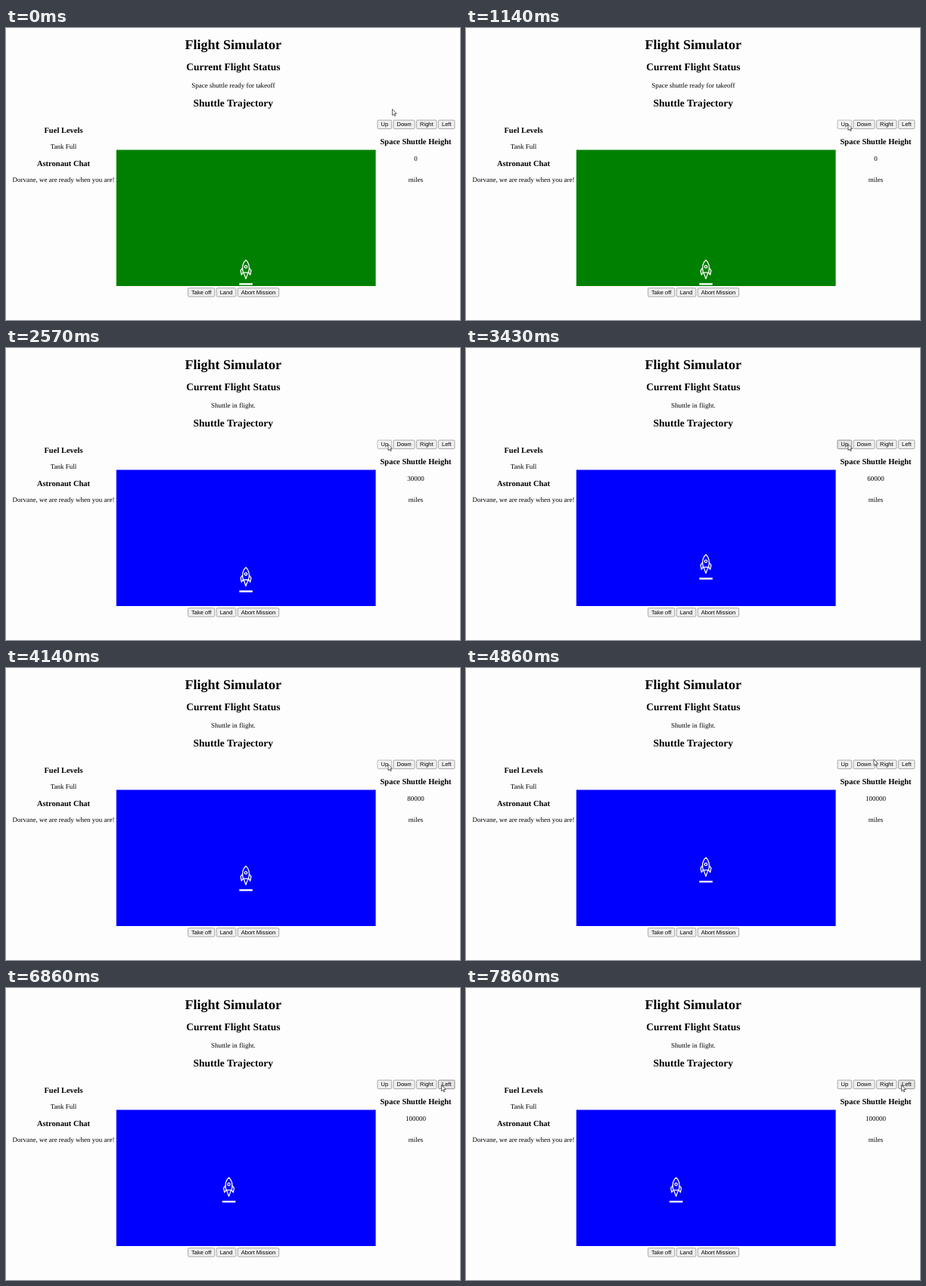
These frames come from a looping animation (600 px wide and 387 px high, 8000 ms). An HTML page:

```html
<!DOCTYPE html>
<html lang="en">
<head>
<meta charset="utf-8">
<title>Flight Simulator</title>
<style>
html, body { margin: 0; width: 100%; height: 100%; overflow: hidden; background: #fefdfe; }
svg { display: block; width: 600px; height: 387px; text-rendering: geometricPrecision; }
text { font: 9px "Liberation Serif", "Times New Roman", serif; text-anchor: middle; }
.h1 { font-size: 18px; font-weight: bold; }
.h2 { font-size: 13.5px; font-weight: bold; }
.h3 { font-size: 10.53px; font-weight: bold; }
.button text { font: 7.5px "Liberation Sans", Arial, sans-serif; }
.button rect { fill: #efefef; stroke: #767676; stroke-width: .6; }
.button.hover rect { fill: #e5e5e5; stroke: #4f4f4f; }
.button.press rect { fill: #f5f5f5; stroke: #8d8d8d; }
</style>
</head>
<body>
<svg id="stage" viewBox="0 0 600 387">
  <g transform="translate(300.3)">
    <text class="h1" y="27.6">Flight Simulator</text>
    <text class="h2" y="56.2">Current Flight Status</text>
    <text id="status" y="78.9"></text>
    <text class="h2" y="104.2">Shuttle Trajectory</text>
  </g>
  <g transform="translate(76)">
    <text class="h3" y="139">Fuel Levels</text>
    <text y="160.4">Tank Full</text>
    <text class="h3" y="182.6">Astronaut Chat</text>
    <text y="204.2">Dorvane, we are ready when you are!</text>
  </g>
  <g transform="translate(541.5)">
    <text class="h3" y="153.8">Space Shuttle Height</text>
    <text id="height" y="175.7"></text>
    <text y="204.2">miles</text>
  </g>

  <rect id="sky" x="145.8" y="161.5" width="342.8" height="180.5"/>
  <g id="rocket" fill="none" stroke="#fff" stroke-width="1.3" stroke-linejoin="round">
    <path d="M0 .5C-3.6 3.6-5.5 9-3.6 17H3.6C5.5 9 3.6 3.6 0 .5Z"/>
    <path d="M-4.5 11L-6.9 14.3-5.8 20-3.5 17M4.5 11L6.9 14.3 5.8 20 3.5 17M-2.9 17.3L0 25.3 2.9 17.3"/>
    <circle cy="9.3" r="1.7"/>
    <path d="M-8.7 32.3H8.8" stroke-width="2.4"/>
  </g>
  <g id="buttons"></g>
  <path id="cursor" d="M0 0V8.2L1.9 6.5 3.1 9.2 4.3 8.7 3.1 6H5.7Z" fill="#fff" stroke="#222" stroke-width=".7"/>
</svg>
<script>
const $ = id => document.getElementById(id);
const LOOP = 8000, FRAME = 1000 / 7, STEP = 5.625;
const PAD = 4.5, GAP = 2.4, BUTTON_H = 11.5;

// Each button is as wide as its label plus padding
function buttonRow(x, y, ...labels) {
  return labels.map(label => {
    const node = document.createElementNS('http://www.w3.org/2000/svg', 'g');
    node.setAttribute('class', 'button');
    node.innerHTML = `<rect y="${y}" height="${BUTTON_H}" rx="1.4"/><text y="${y + 8.1}">${label}</text>`;
    $('buttons').append(node);
    const [rect, text] = node.children;
    const left = x, w = text.getComputedTextLength() + 2 * PAD;
    rect.setAttribute('x', left);
    rect.setAttribute('width', w);
    text.setAttribute('x', left + w / 2);
    x += w + GAP;
    return { node, left, right: left + w, y };
  });
}
const buttons = [
  ...buttonRow(491, 122.1, 'Up', 'Down', 'Right', 'Left'),
  ...buttonRow(240.6, 344.6, 'Take off', 'Land', 'Abort Mission')
];

const clamp = (v, lo, hi) => Math.min(hi, Math.max(lo, v));

// Click counts by frame: the "Up" clicks speed up, the "Left" clicks come in two even bursts
const upClicks = f => f < 9 ? 0 : Math.min(10, 1 + Math.floor(((f - 8.96) / 3.955) ** 1.25));
const burst = (f, from, max) => clamp(Math.floor((f - from) / 2) + 1, 0, max);
const leftClicks = f => burst(f, 41, 4) + burst(f, 51, 3);
const clicks = f => upClicks(f) + leftClicks(f);

const START = [510.5, 107.5], ON_UP = [505, 127.5], BETWEEN = [539, 121], ON_LEFT = [575.5, 128.5];
const glide = (f, from, to, a, b) => a.map((v, i) => v + (b[i] - v) * clamp((f - from) / (to - from), 0, 1));

function pointer(f) {
  if (f < 32) return glide(f, 0, 4, START, ON_UP);
  if (f < 34) return glide(f, 32, 34, ON_UP, BETWEEN);
  return glide(f, 34, 38, BETWEEN, ON_LEFT);
}

function draw(t) {
  const f = Math.floor((t + 5) / FRAME);
  const up = upClicks(f), left = leftClicks(f);
  const [mx, my] = pointer(f);
  const active = clicks(f + 1) > clicks(f) ? 'press' : 'hover';

  $('status').textContent = up ? 'Shuttle in flight.' : 'Space shuttle ready for takeoff';
  $('height').textContent = up * 10000;
  $('sky').setAttribute('fill', up ? '#00f' : '#008000');
  $('rocket').setAttribute('transform', `translate(${317 - left * STEP} ${307.1 - up * STEP})`);
  $('cursor').setAttribute('transform', `translate(${mx} ${my})`);

  for (const b of buttons) {
    const over = mx > b.left && mx < b.right && my > b.y && my < b.y + BUTTON_H;
    b.node.setAttribute('class', over ? `button ${active}` : 'button');
  }
}

const start = performance.now();
function tick() {
  draw((performance.now() - start) % LOOP);
  requestAnimationFrame(tick);
}
tick();
</script>
</body>
</html>
```
